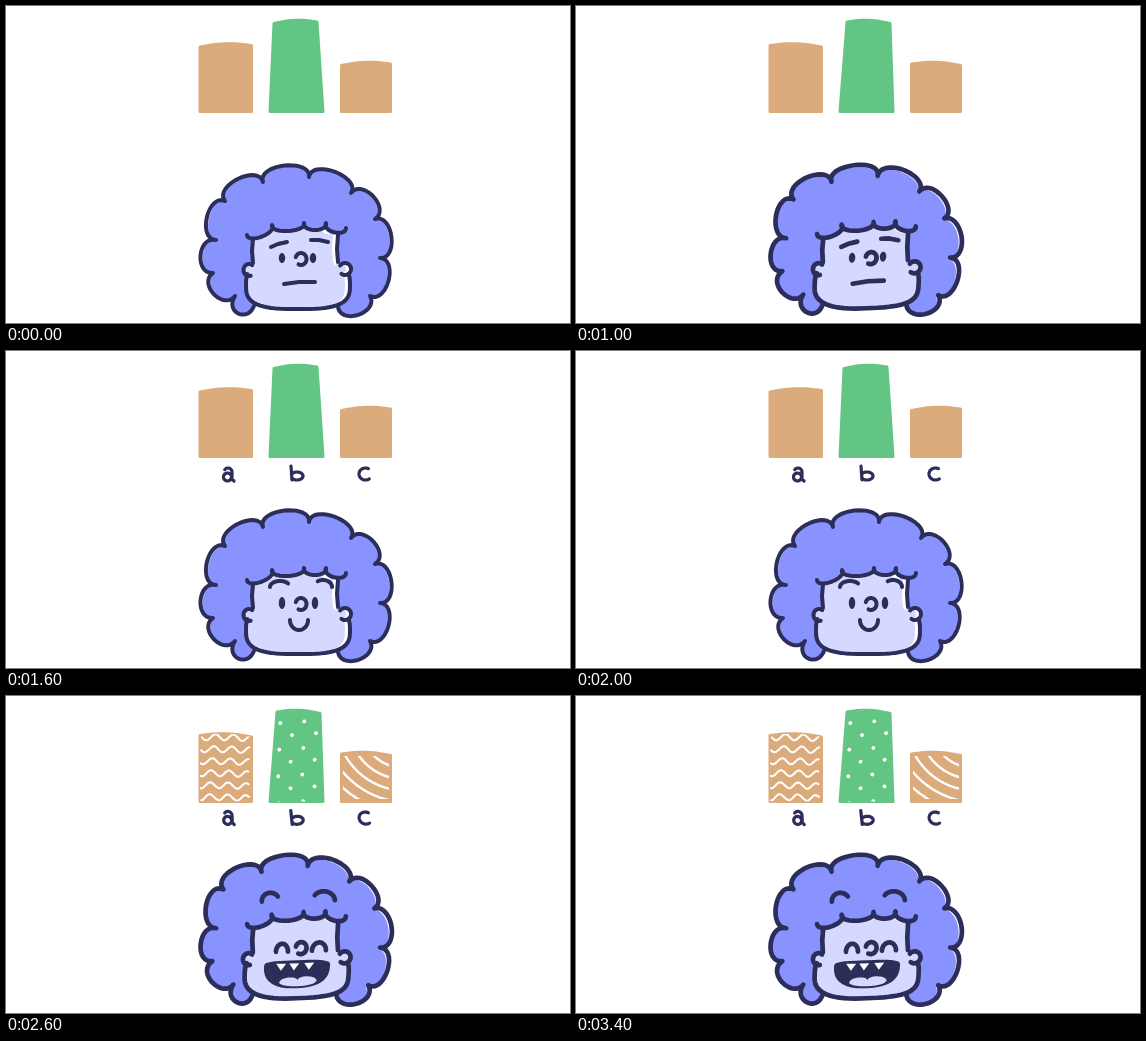
These frames come from a looping animation (564x317 px, 3600 ms). An HTML page with a canvas:

```html
<!DOCTYPE html>
<html lang="en">
<head>
<meta charset="utf-8">
<title>Three bars</title>
<style>
html, body { margin: 0; width: 100%; height: 100%; overflow: hidden; background: #fff; }
canvas { display: block; }
</style>
</head>
<body>
<canvas id="stage" width="564" height="317"></canvas>
<script>
const ctx = document.getElementById('stage').getContext('2d');
const INK = '#2c2e59', HAIR = '#8893ff', SKIN = '#d5d9ff';
const TAN = '#dbab7c', GREEN = '#63c584', WHITE = '#fff';
const LOOP = 3600, BOIL = 200, MOOD = 1200, PI = Math.PI;

// Shapes are lists of points. Version 1 bends them a little for a hand-drawn wobble.
let version = 0;

function wobble([x, y]) {
  return version
    ? [x - 0.7 + Math.sin(y / 17), y - 1 + 0.8 * Math.sin(x / 19)]
    : [x, y];
}

function sample(count, point) {
  return Array.from({ length: count + 1 }, (_, i) => point(i / count));
}

// Part of an ellipse; a power below 1 makes it squarer.
function arc(x, y, rx, ry, from, to, power = 1) {
  const bend = n => Math.sign(n) * Math.abs(n) ** power;
  return sample(40, t => {
    const angle = from + (to - from) * t;
    return [x + rx * bend(Math.cos(angle)), y + ry * bend(Math.sin(angle))];
  });
}

// A round lobe between each two neighbouring points, to the left of travel.
function scallops(points, depth) {
  return points.slice(1).flatMap(([x2, y2], i) => {
    const [x1, y1] = points[i], dx = x2 - x1, dy = y2 - y1;
    const length = Math.hypot(dx, dy);
    return sample(20, t => {
      const rise = Math.sin(PI * t);
      const along = 0.5 - 0.5 * Math.cos(PI * t) * (1 + 0.15 * rise);
      return [x1 + dx * along + dy / length * depth * rise,
              y1 + dy * along - dx / length * depth * rise];
    });
  });
}

function pathOf(points, bend = wobble) {
  const path = new Path2D();
  points.map(bend).forEach(([x, y]) => path.lineTo(x, y));
  return path;
}

function fill(points, color) {
  ctx.fillStyle = color;
  ctx.fill(pathOf(points));
}

function stroke(width, color, ...lines) {
  ctx.lineWidth = width;
  ctx.strokeStyle = color;
  lines.forEach(line => ctx.stroke(pathOf(line)));
}

function clipped(path, paint) {
  ctx.save();
  ctx.clip(path);
  paint();
  ctx.restore();
}

const hair = scallops([
  [248, 300], [229, 290], [207, 267], [210, 234], [219, 195], [257, 176],
  [303, 171], [345, 187], [369, 213], [374, 252], [364, 290], [332, 301]], 14);
const parting = [[266, 219], [298, 217], [320, 217]];
const fringe = scallops([[241, 229], ...parting, [340, 222]], -7);

const jaw = arc(292, 279, 52, 24, -0.3, PI + 0.3, 0.65);
const leftEar = arc(243, 264, 5.5, 6, 0.4 * PI, 1.7 * PI);
const rightEar = arc(339, 263, 6, 6, -0.8 * PI, 0.7 * PI);
const leftCheek = [[247, 233], [246, 245], [247, 257]];
const rightCheek = [[332, 229], [331, 243], [332, 256]];
const head = [
  ...scallops([[247, 231], ...parting, [332, 226]], -6),
  ...rightCheek, ...rightEar, ...jaw, ...leftEar, [247, 257]];

const nose = arc(295, 253, 5.5, 6, -0.9 * PI, 0.65 * PI);
const eyes = (right, height) =>
  [276, right].map(x => arc(x, 252, 3.2, height, 0, 2 * PI));

const moods = [
  { eyes: eyes(307, 5),
    lines: [[[265, 241], [272, 238], [281, 236]], [[305, 234], [313, 234], [322, 236]],
            [[278, 278], [293, 276], [309, 276]]] },
  { eyes: eyes(309, 6),
    lines: [arc(274, 236, 10, 6, PI, 1.8 * PI), arc(317, 236, 9, 7, 1.3 * PI, 2 * PI),
            arc(293, 269, 9, 10, 0, PI)] },
  { eyes: [], laughing: true,
    lines: [arc(266, 206, 9, 9, PI, 1.8 * PI), arc(319, 206, 11, 9, 1.2 * PI, 2 * PI),
            arc(276, 256, 6, 8, PI, 2 * PI), arc(313, 256, 7, 8, PI, 2 * PI)] }
];

const mouth = [...arc(292, 271, 33, 6, PI, 2 * PI, 0.6), ...arc(292, 271, 33, 22, 0, PI, 0.8)];
const teeth = [276, 289, 304].map(x => [[x - 5, 268], [x + 5, 268], [x, 275]]);
const tongue = [
  ...scallops([[275, 288], [293, 286], [312, 287]], 5),
  ...arc(293, 287, 18, 4, 0, PI)];

const letters = [
  arc(221.5, 126, 4, 4, 0, 2 * PI),
  [...arc(222, 121, 4, 4, 1.2 * PI, 2 * PI), [226, 128], [228, 130]],
  [[285, 115], [286, 129]],
  arc(291, 125, 6, 4, -0.8 * PI, 0.8 * PI),
  arc(359.5, 123, 6.5, 6, -0.35 * PI, -1.7 * PI)
];

const bars = [
  { left: 194, right: 245.5, top: 38, taper: 0, color: TAN, pattern: drawWaves },
  { left: 264, right: 317, top: 14.5, taper: 4, color: GREEN, pattern: drawDots },
  { left: 335.5, right: 384.5, top: 56.5, taper: 0, color: TAN, pattern: drawStripes }
];

function drawWaves() {
  const [tilt, wavelength, gap, first] = version ? [0, 18, 12, 43] : [-0.3, 24, 13, 54];
  for (let row = 0; row < 6; row++) {
    stroke(2, WHITE, sample(40, t => [
      196 + 48 * t,
      first + row * gap + 48 * t * tilt + 3 * Math.sin(48 * t / wavelength * 2 * PI + row / 3)]));
  }
}

function drawDots() {
  const [gap, rx, ry] = version ? [24, 1.9, 1.9] : [19, 2, 2.7];
  for (let row = 0; row < 8; row++) {
    for (let column = -2; column < 3; column++) {
      const x = 286 + (column + row % 2 / 2) * gap;
      fill(arc(x, 13 + row * 13.3 - column, rx, ry, 0, 2 * PI), WHITE);
    }
  }
}

// Rings around a near centre look curved, around a far one straight.
function drawStripes() {
  const [x, y, radius, gap] = version ? [400, 25, 47, 11.3] : [879, -529, 779, 9.7];
  const inset = new Path2D();
  inset.rect(337, 60, 46, 43);
  clipped(inset, () => {
    for (let i = 0; i < 5; i++) {
      const r = radius + i * gap;
      stroke(2.4, WHITE, arc(x, y, r, r, 0.55 * PI, 0.95 * PI));
    }
  });
}

function drawBar({ left, right, top, taper, color, pattern }, patterned) {
  const lean = version * taper * 0.75;
  const x1 = left + taper + lean, x2 = right - taper * 1.5 + lean;
  const y1 = top + 3 - version * 1.5, y2 = top + 1.5 + version * 1.5;
  const edge = sample(12, t => [
    x1 + (x2 - x1) * t, y1 + (y2 - y1) * t - 2.5 * Math.sin(PI * t)]);
  const shape = pathOf([[left, 105.5], ...edge, [right, 105.5]], p => p);
  shape.closePath();
  ctx.fillStyle = ctx.strokeStyle = color;
  ctx.lineWidth = 3;
  ctx.fill(shape);
  ctx.stroke(shape);
  if (patterned) clipped(shape, pattern);
}

function drawHead({ eyes, lines, laughing }) {
  // Colours sit slightly off their outlines, like a loose print.
  ctx.save();
  ctx.translate(291 - version, 290 + version);
  ctx.scale(0.977, 0.99);
  ctx.translate(-291, -290);
  fill(hair, HAIR);
  ctx.restore();

  fill(head, WHITE);
  clipped(pathOf(head), () => {
    ctx.translate(version ? -2 : -5, 0);
    fill(head, SKIN);
  });

  const width = version ? 4.7 : 4;
  stroke(width, INK, hair, fringe, jaw, leftEar, rightEar, leftCheek, rightCheek, nose, ...lines);
  eyes.forEach(eye => fill(eye, INK));
  if (!laughing) return;
  fill(mouth, INK);
  teeth.forEach(tooth => fill(tooth, WHITE));
  fill(tongue, SKIN);
}

function draw(now) {
  const time = now % LOOP;
  version = Math.floor(time / BOIL) % 2;
  const mood = Math.floor(time / MOOD);
  ctx.fillStyle = WHITE;
  ctx.fillRect(0, 0, 564, 317);
  bars.forEach(bar => drawBar(bar, mood === 2));
  if (mood > 0) stroke(3.2, INK, ...letters);
  drawHead(moods[mood]);
}

ctx.lineCap = ctx.lineJoin = 'round';
const start = performance.now();
function tick() {
  draw(performance.now() - start);
  requestAnimationFrame(tick);
}
tick();
</script>
</body>
</html>
```
